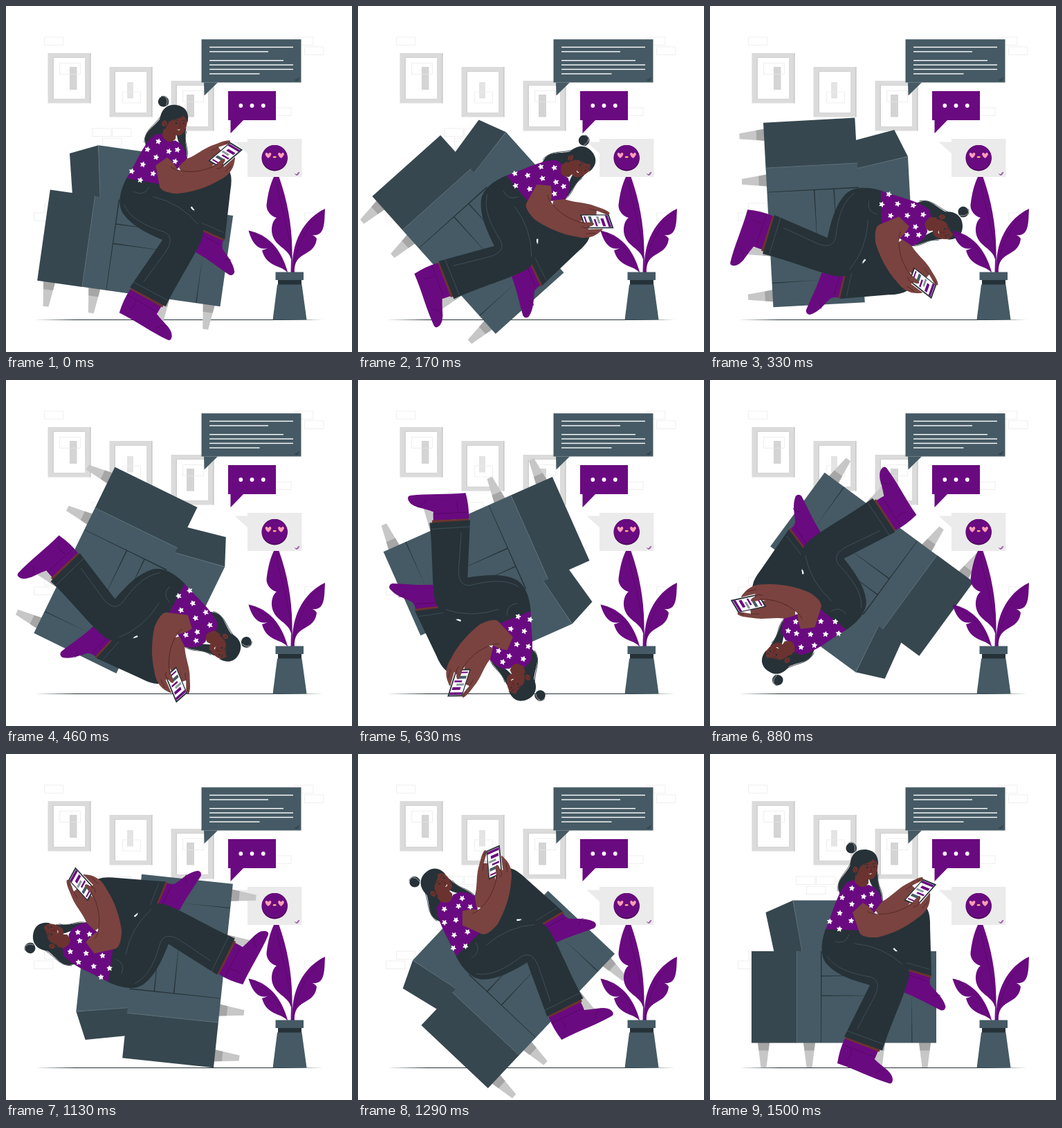
An HTML page with a canvas that plays this animation: 500x500 px, repeating every 1540 ms.

```html
<!DOCTYPE html>
<html lang="en">
<head>
<meta charset="utf-8">
<title>Tumbling armchair</title>
<style>
html, body { margin: 0; width: 100%; height: 100%; overflow: hidden; background: #fff; }
canvas { display: block; width: 500px; height: 500px; }
</style>
</head>
<body>
<canvas id="stage"></canvas>
<script>
const canvas = document.getElementById('stage');
const ctx = canvas.getContext('2d');
const ratio = window.devicePixelRatio || 1;
canvas.width = canvas.height = 500 * ratio;

const PURPLE = '#6a0a80', PLUM = '#4d075d';
const SLATE = '#455a64', DEEP = '#37474f', INK = '#263238';
const SKIN = '#7a433f', FACE = '#6b332f', SHADE = '#4f2422';
const GREY = '#dbdbdb', PALE = '#ebebeb';

const LOOP = 1540, STEP = 41.667, LAST_STEP = 36;
const PIVOT = [199.8, 302.1];
// Step index and rotation in degrees
const TURN = [[0, 8.1], [4, 48.1], [11, 116], [15, 156.1], [21, 216.3], [27, 276], [36, 360]];

function fill(color, path) {
  ctx.fillStyle = color;
  ctx.fill(new Path2D(path));
}

function line(color, width, path) {
  ctx.strokeStyle = color;
  ctx.lineWidth = width;
  ctx.stroke(new Path2D(path));
}

function rect(color, x1, y1, x2, y2) {
  ctx.fillStyle = color;
  ctx.fillRect(x1, y1, x2 - x1, y2 - y1);
}

function oval(color, x, y, rx, ry = rx) {
  ctx.fillStyle = color;
  ctx.beginPath();
  ctx.ellipse(x, y, rx, ry, 0, 0, Math.PI * 2);
  ctx.fill();
}

function brick(x, y, w = 27, h = 11.5) {
  ctx.strokeStyle = '#e8e8e8';
  ctx.lineWidth = 0.7;
  ctx.strokeRect(x, y, w, h);
}

function star(x, y) {
  ctx.beginPath();
  for (let i = 0; i < 10; i++) {
    const angle = i * Math.PI / 5 - 1.45;
    const radius = i % 2 ? 1.9 : 3.9;
    ctx.lineTo(x + radius * Math.cos(angle), y + radius * Math.sin(angle));
  }
  ctx.closePath();
  ctx.fillStyle = ctx.strokeStyle = '#fff';
  ctx.lineWidth = 0.8;
  ctx.fill();
  ctx.stroke();
}

function picture(x, y) {
  rect(GREY, x, y, x + 62, y + 72.5);
  rect('#c9c9c9', x + 60.5, y, x + 62, y + 72.5);
  rect('#cfcfcf', x + 7, y + 6, x + 53.5, y + 66.5);
  rect('#fff', x + 8.5, y + 7, x + 53.5, y + 66);
}

function drawWall() {
  [[56, 45], [417, 45], [432, 59], [385, 147], [432, 299], [41, 299],
   [56, 285], [125, 177], [154, 177], [140, 191]].forEach(([x, y]) => brick(x, y));
  picture(60.5, 68);
  rect('#d4d4d4', 92, 88, 102.5, 121);
  brick(78, 82.5, 29.5, 16);
  picture(149.5, 88);
  rect('#e4e4e4', 175, 110, 184, 133.5);
  brick(169, 124, 25.5, 16);
  picture(238.5, 108);
  rect('#d4d4d4', 261, 128, 272, 160.5);
  brick(256, 122.5, 29.5, 16);
  fill(INK, 'M42 453.5L100 453H400L458 453.5L400 454H100Z');
}

function heart(x, y) {
  fill('#ff9db8', `M${x} ${y + 4}C${x - 8} ${y - 2} ${x - 3} ${y - 7} ${x} ${y - 2}` +
    `C${x + 3} ${y - 7} ${x + 8} ${y - 2} ${x} ${y + 4}Z`);
}

function drawBubbles() {
  rect(SLATE, 282.5, 48.2, 426.5, 110.5);
  fill(SLATE, 'M286 110.5H306L286.500 129.500Z');
  [[59.5, 415], [66, 379], [78.7, 401], [85.1, 415], [91.5, 415], [98, 366.5]]
    .forEach(([y, end]) => rect('#fff', 294, y - 0.7, end, y + 0.7));
  line(INK, 0.8, 'M417 106l2 2 3-4M420 107l1 1 3-4');

  rect(PURPLE, 321, 123, 390, 165);
  fill(PURPLE, 'M324.500 165H343L324.500 184Z');
  [339.3, 355.5, 371.8].forEach(x => oval('#fff', x, 144, 2.9));

  rect(PALE, 349, 192, 427.5, 247);
  fill(PALE, 'M330.500 196.500H350V214Z');
  oval(PLUM, 388.2, 219.7, 18.8);
  oval(PURPLE, 388.2, 218.8, 18.2, 17.8);
  heart(379, 216);
  heart(397.5, 216);
  oval('#ffb573', 388.2, 218.3, 2.6, 1.3);
  line(PURPLE, 0.8, 'M417.500 242.500l2 2 3-4M420 243.500l1 1 3-4');
}

function drawPlant() {
  fill(PURPLE, 'M387 247H394.500C406 279 413 315 413.500 352L414 386H411.500L412 366' +
    'C408 350 390 348 385 331C382 320 386 309 391 306C383 304 376 296 376.500 287.500C378 275 381 259 387 247Z');
  fill(PURPLE, 'M350.500 324.500C378 330 398 350 407.500 386C399 374 376 378 370 353' +
    'Q374 352 378 350C364 354 355 341 350.500 324.500Z');
  fill(PURPLE, 'M461 293C431 307 411 341 414 386L417 385' +
    'C416 352 446 364 449 336Q446 332 443 331C461 333 460 314 461 293Z');
  line(PLUM, 0.5, 'M391 253C397 292 410 326 411 356M352 326C377 338 396 359 405 382' +
    'M459 296C434 317 419 347 416 380');
  rect(SLATE, 389.5, 384.5, 430, 396);
  rect(INK, 393, 396, 427, 403);
  fill(SLATE, 'M392 402.500H427.500L434.500 453.500H385.500Z');
}

function drawChair() {
  [69, 135, 236, 302].forEach(x => {
    fill('#c7c7c7', `M${x} 417H${x + 17}L${x + 12.5} 453H${x + 4.5}Z`);
    fill('#a6a6a6', `M${x} 417H${x + 17}L${x + 15.5} 428.500H${x + 1.5}Z`);
  });
  fill(SLATE, 'M120 211.500H208L224 290H133Z');
  fill(DEEP, 'M80.500 229L120 211.500L133.500 286H92.500Z');
  line('#758790', 0.6, 'M120 212L133 285');
  rect(SLATE, 125, 285, 327, 417.5);
  rect(DEEP, 60, 285, 125.5, 417.5);
  line('#71838b', 0.6, 'M125.500 285V417');
  fill(INK, 'M160 285H161.500L161 417H160.300ZM161 320L225 320.500L161 321.500Z' +
    'M161 348.500L250 349L161 350ZM291.500 346L292.500 417H291.300Z');
}

function drawFarLeg() {
  fill(PURPLE, 'M285 308L319 320Q316 329 319 335C327 344 337 352 340.500 365' +
    'Q340 371 334 370.500C318 363 300 352 281 345Z');
  line(PLUM, 0.7, 'M284 318L314 329M322 351Q329 346 333 349');
  fill(FACE, 'M272 306L320 320L319 323.500L272 309Z');
  fill(INK, 'M222 254L296 226Q307 216 314 224Q318.500 232 318 250L320 320.500L270 306' +
    'L271 285L266 280L262 285L222 272Z');
  line('#50616a', 0.5, 'M274 299L317 311');
}

function drawNearLeg() {
  fill(PURPLE, 'M195 411L243 429L238 441C248 452 263 458 264 470' +
    'Q264 477 259 476C235 469 211 456 184 447Q187 427 195 411Z');
  line(PLUM, 0.7, 'M192 420L235 437M240 461Q249 454 256 457M199 441Q205 434 204 427');
  fill(FACE, 'M197 407L246 426L244.500 430.500L195 411.500Z');
  fill(INK, 'M167 253H218C224 264 246 264 268 285C283 295 289 307 287.500 322' +
    'C283 345 261 390 249 428.500L194 408.500L231 334' +
    'C206 327 184 320 169 304C158 291 161 270 167 253Z');
  line('#566770', 0.5, 'M198 400L250 419M213 397L238 350Q249 327 231 322' +
    'C202 317 180 309 169 292M181 271Q196 276 201 261M209 274Q250 278 278 304');
}

function drawHead() {
  fill(INK, 'M207 152C199 174 182 180 186 197Q188 205 192 210L208 184L230 181' +
    'C234 194 241 199 248 213C251 201 241 193 242 170L225 145Z');
  line(INK, 0.8, 'M203 158C195 174 183 180 185 198M243 174C240 191 252 197 249 214');
  oval(INK, 204, 136, 7.6, 7.4);
  line(INK, 0.7, 'M200 129C207 125 214 132 211 140');
  line('#fff', 0.5, 'M207 130Q211 133 209 140');
}

function drawFace() {
  fill(FACE, 'M211 168L209 184Q219 199 229 187L229 176Z');
  fill(FACE, 'M210 157L227 146L242 154C243 164 242 173 237 179C231 185 216 178 212 170Z');
  fill(INK, 'M204 172C199 151 208 138 223 138C237 138 244 147 243 161' +
    'Q241 155 235 152C232 159 219 156 215 167L212 175Z');
  oval(FACE, 210, 167, 3.6, 4.6);
  line(SHADE, 0.7, 'M208 165Q211 165 211 170M232 163L234 169L231 169');
  line(INK, 0.9, 'M223 160Q226 158 229 160M235 159L239 158');
  oval(INK, 227, 164, 1.4);
  oval(INK, 237.5, 163, 1.3);
  fill('#fff', 'M229 172.500Q231.500 173.500 234 172Q232.500 175.500 229 172.500Z');
}

function drawShirt() {
  fill(PURPLE, 'M198 185L209 182Q217 194 229 189L238 193Q246 201 250 214L238 229' +
    'L222 245L219 255L167 253C177 232 183 202 198 185Z');
  [[191, 207.5], [205, 194], [205, 217], [222, 206], [233, 219], [187.5, 230], [173, 242],
   [187, 253], [204, 241], [234, 202]].forEach(([x, y]) => star(x, y));
}

function drawPhone() {
  ctx.save();
  // Screen axes: 18 units across, 38 units down
  ctx.transform(1, 0.42, -0.7, 0.79, 308, 181);
  rect(INK, -0.5, -0.5, 19, 39);
  rect('#fff', 0.7, 1.5, 17.3, 37);
  rect(PURPLE, 0.7, 2, 17.3, 5.5);
  rect(PURPLE, 5, 9, 16, 13);
  rect('#8b989e', 2, 15, 12, 18);
  rect(PURPLE, 6, 20, 16, 22.5);
  rect(SLATE, 2, 25, 12, 29);
  rect(PURPLE, 2, 33, 16, 35);
  ctx.restore();
}

function drawArms() {
  fill(SKIN, 'M239 226L249 213C261 207 271 195 282 189C292 184 300 178 307 178' +
    'Q310 181 304 184L292 190L300 198L279 230L247 237Z');
  line(SHADE, 0.7, 'M292 190L283 196M300 183L305 181');
  drawPhone();
  fill(SKIN, 'M206 229L221 215Q233 222 238 231C260 235 278 224 293 214' +
    'Q299 206 303 205Q306 207 302 213L304 217L315 204Q319 197 318 207' +
    'C318 220 311 230 300 237C283 251 262 260 242 265Q219 266 216 258Z');
  line(SHADE, 0.8, 'M238 231C257 233 276 228 294 215M302 213Q301 221 294 221' +
    'M307 223L315 213M228 228Q233 231 239 231');
}

function turnAt(step) {
  const i = TURN.findIndex(([end], n) => n > 0 && step <= end);
  const [s0, a0] = TURN[i - 1], [s1, a1] = TURN[i];
  return a0 + (a1 - a0) * (step - s0) / (s1 - s0);
}

function drawSitter(angle) {
  ctx.save();
  ctx.translate(...PIVOT);
  ctx.rotate(angle * Math.PI / 180);
  ctx.translate(-PIVOT[0], -PIVOT[1]);
  drawChair();
  drawFarLeg();
  drawHead();
  drawNearLeg();
  drawShirt();
  drawFace();
  drawArms();
  ctx.restore();
}

function draw(now) {
  // Display times fall on whole hundredths of a second
  const time = Math.floor(now % LOOP / 10) * 10;
  const step = Math.min(LAST_STEP, Math.floor((time + 5) / STEP));
  ctx.setTransform(ratio, 0, 0, ratio, 0, 0);
  ctx.lineCap = ctx.lineJoin = 'round';
  rect('#fff', 0, 0, 500, 500);
  drawWall();
  drawBubbles();
  drawSitter(turnAt(step));
  drawPlant();
}

let start;
function tick(now) {
  start ??= now;
  draw(now - start);
  requestAnimationFrame(tick);
}
draw(0);
requestAnimationFrame(tick);
</script>
</body>
</html>
```
